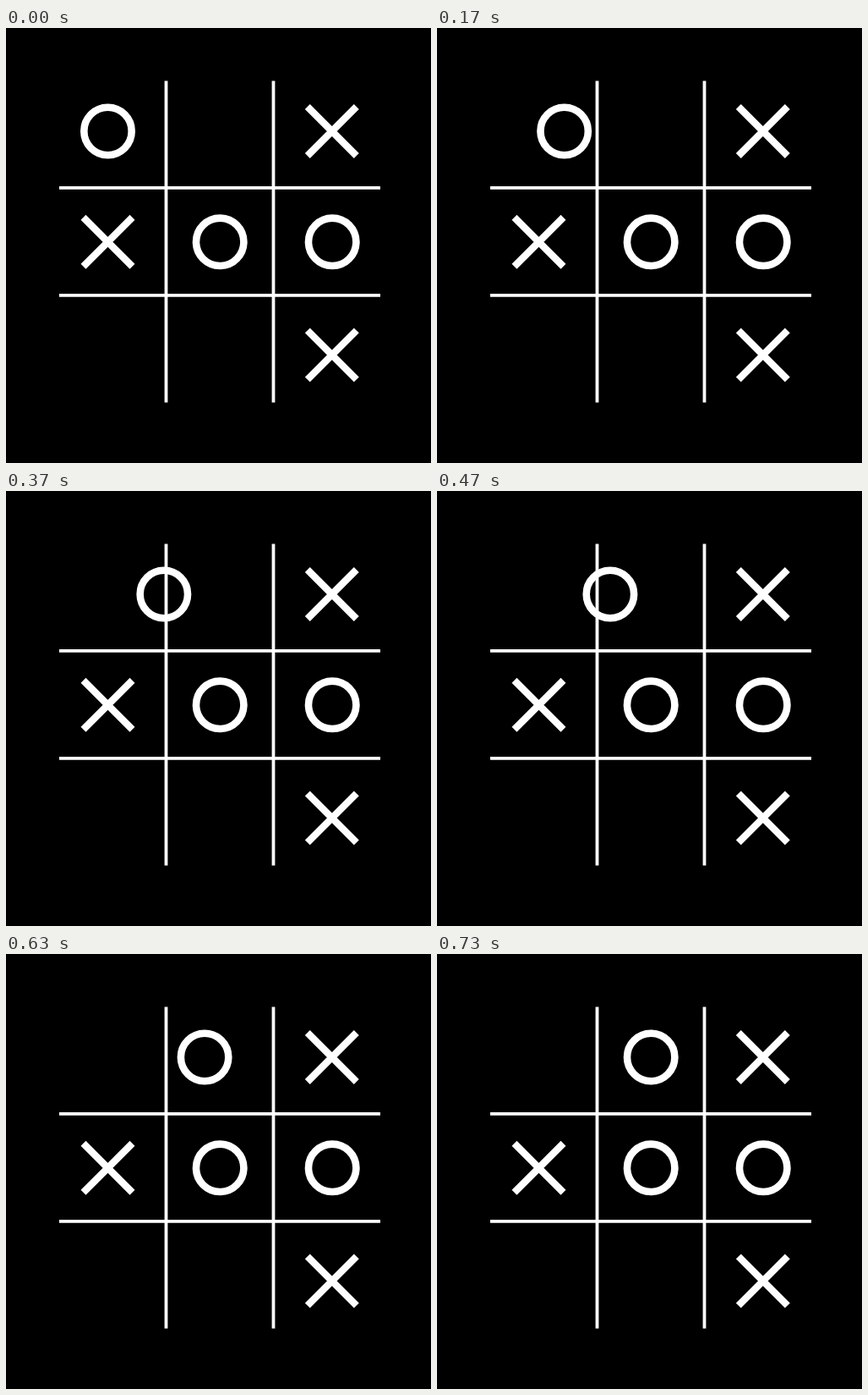
Recreate the animation shown at these times as an HTML page. Size 503 by 514 pixels, loop 3010 ms.

```html
<!DOCTYPE html>
<html lang="en">
<head>
<meta charset="utf-8">
<title>Tic-tac-toe</title>
<style>
  html, body { margin: 0; width: 100%; height: 100%; overflow: hidden; background: #000; }
  svg { display: block; width: 503px; height: 514px; }
</style>
</head>
<body>
<svg viewBox="0 0 503 514" fill="none" stroke="#fff">
  <defs>
    <circle id="nought" r="28.2" stroke-width="8.6"/>
    <path id="cross" d="M-29-29L29 29M29-29L-29 29" stroke-width="8.4"/>
  </defs>
  <path d="M189.5 62.5V442.5M316.5 62.5V442.5M63 188.8H443M63 315.9H443" stroke-width="3.8"/>
  <use href="#cross" x="385.8" y="122"/>
  <use href="#cross" x="120.5" y="252.8"/>
  <use href="#cross" x="385.8" y="386.4"/>
  <use href="#nought" x="253.2" y="252.8"/>
  <use href="#nought" x="386.2" y="252.8"/>
  <use id="mover" href="#nought" x="120.5" y="122"/>
</svg>
<script>
  const LOOP = 3010;
  const STEPS = 22;
  const START_X = 120.5;
  const END_X = 253.2;
  const mover = document.getElementById('mover');

  // Thirty steps a second, each starting on a whole hundredth.
  function stepAt(time) {
    const hundredths = Math.floor(time / 10);
    return Math.min(STEPS, Math.floor((3 * hundredths + 1) / 10));
  }

  function draw(time) {
    const progress = stepAt(time % LOOP) / STEPS;
    mover.setAttribute('x', START_X + (END_X - START_X) * progress);
  }

  const start = performance.now();
  function tick() {
    draw(performance.now() - start);
    requestAnimationFrame(tick);
  }
  tick();
</script>
</body>
</html>
```
